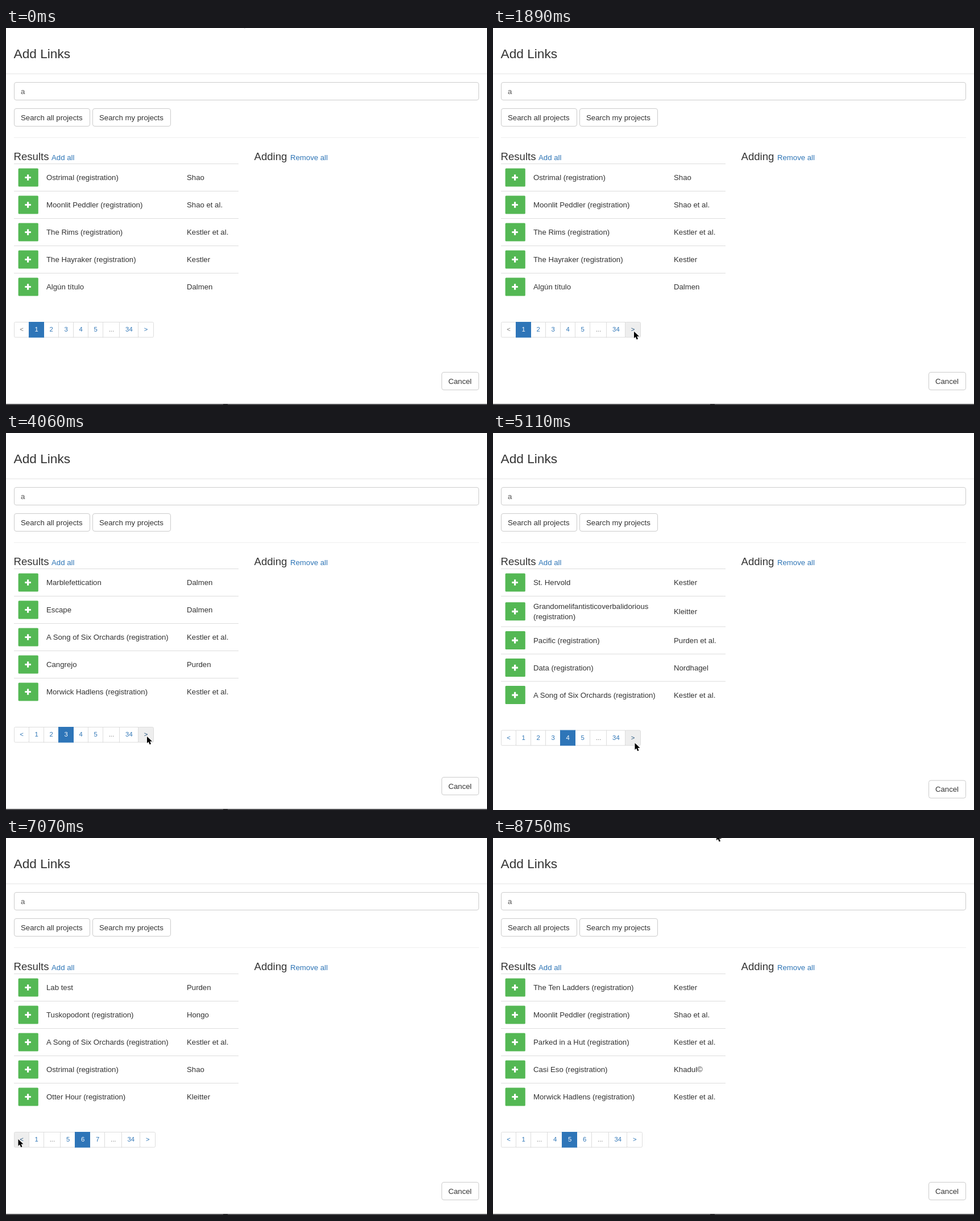
These frames come from a looping animation (846 px wide and 662 px high, 9030 ms). An HTML page:

```html
<!DOCTYPE html>
<html lang="en">
<head>
<meta charset="utf-8">
<title>Add Links</title>
<style>
html, body { margin: 0; width: 100%; height: 100%; overflow: hidden; background: #fff; }
svg { display: block; width: 846px; height: 662px; }
text { font: 13.2px "Liberation Sans", Arial, sans-serif; fill: #333; white-space: pre; }
.title { font-size: 22.7px; }
.head { font-size: 18.6px; }
.link { fill: #2e75b6; }
.input { fill: #555; }
.page { font-size: 11.3px; text-anchor: middle; fill: #2e75b6; }
.page.off { fill: #777; }
.page.on { fill: #fff; }
.page.hover { fill: #23527c; }
</style>
</head>
<body>
<svg viewBox="0 0 846 662"><g id="dialog"></g>
<path id="cursor" d="M0 0v11.8l2.7-2.6 2 4.7 2.3-1-2-4.5h4z" stroke="#fff" paint-order="stroke"/></svg>
<script>
const LOOP = 9030, STEP = 70;
const REG = " (registration)";

// One list per page; each row is a title and an author
const pages = [
  [["Ostrimal" + REG, "Shao"], ["Moonlit Peddler" + REG, "Shao et al."], ["The Rims" + REG, "Kestler et al."],
   ["The Hayraker" + REG, "Kestler"], ["Algún título", "Dalmen"]],
  [["Moonlit Peddler" + REG, "Shao et al."], ["Sample study", "Purden"], ["Parked in a Hut" + REG, "Kestler et al."],
   ["Otter Hour" + REG, "Kleitter"], ["Field notes" + REG, "Shao"]],
  [["Marblefettication", "Dalmen"], ["Escape", "Dalmen"], ["A Song of Six Orchards" + REG, "Kestler et al."],
   ["Cangrejo", "Purden"], ["Morwick Hadlens" + REG, "Kestler et al."]],
  [["St. Hervold", "Kestler"], ["Grandomelifantisticoverbalidorious\n(registration)", "Kleitter"],
   ["Pacific" + REG, "Purden et al."], ["Data" + REG, "Nordhagel"], ["A Song of Six Orchards" + REG, "Kestler et al."]],
  [["The Ten Ladders" + REG, "Kestler"], ["Moonlit Peddler" + REG, "Shao et al."], ["Parked in a Hut" + REG, "Kestler et al."],
   ["Casi Eso" + REG, "Khadul©"], ["Morwick Hadlens" + REG, "Kestler et al."]],
  [["Lab test", "Purden"], ["Tuskopodont" + REG, "Hongo"], ["A Song of Six Orchards" + REG, "Kestler et al."],
   ["Ostrimal" + REG, "Shao"], ["Otter Hour" + REG, "Kleitter"]]
];
const nextClicks = [2380, 2870, 4130, 5180, 6160];
const prevClick = 7490;

// The pointer eases from one stop to the next; bowX and bowY bend the way there
const stops = [
  { begin: 0, end: 910, x: 244, y: 561, bowY: 290 },
  { begin: 1400, end: 1890, x: 248, y: 533 },
  { begin: 4340, end: 4550, x: 248, y: 523, bowY: 65 },
  { begin: 4620, end: 4760, x: 249.5, y: 544.5 },
  { begin: 5110, end: 5250, x: 244, y: 533 },
  { begin: 5390, end: 5600, x: 244, y: 530, bowY: 58 },
  { begin: 6020, end: 6230, x: 249, y: 562 },
  { begin: 6370, end: 6720, x: 21.5, y: 529 },
  { begin: 7700, end: 8400, x: 388, y: 18, bowX: 600, bowY: 240 },
  { begin: 8470, end: 8750, x: 393, y: -7.5 }
];

function cursorAt(t) {
  let x = 415, y = -13.5;
  for (const stop of stops) {
    if (t < stop.begin) break;
    const u = Math.min(1, (t - stop.begin) / (stop.end - stop.begin));
    const ease = u * u * (3 - 2 * u), bow = Math.sin(Math.PI * u);
    x += (stop.x - x) * ease + (stop.bowX || 0) * bow;
    y += (stop.y - y) * ease + (stop.bowY || 0) * bow;
  }
  return [x, y];
}

const pageAt = t => 1 + nextClicks.filter(at => at <= t).length - (t >= prevClick);

const escapeText = s => s.replace(/</g, "&lt;").replace(/>/g, "&gt;");
const text = (x, y, s, cls = "") => `<text x="${x}" y="${y}" class="${cls}">${escapeText(s)}</text>`;
const rect = (x, y, w, h, fill, more = "") => `<rect x="${x}" y="${y}" width="${w}" height="${h}" fill="${fill}" ${more}/>`;
const box = (x, y, w, h) => rect(x + .5, y + .5, w - 1, h - 1, "#fff", 'stroke="#ccc" rx="3.5"');
const button = (x, y, w, s) => box(x, y, w, 32) + text(x + 12, y + 20.5, s);

const header =
  text(13.5, 53, "Add Links", "title") + rect(0, 80, 846, 1, "#e5e5e5") +
  box(14, 95, 818, 32) + text(26, 116, "a", "input") +
  button(14, 141, 134, "Search all projects") + button(152, 141, 138, "Search my projects") +
  rect(14, 192, 818, 1, "#eee") +
  text(13.5, 232, "Results", "head") + text(80, 231.5, "Add all", "link") +
  text(436.5, 232, "Adding", "head") + text(500, 231.5, "Remove all", "link");

function row(y, height, [title, author]) {
  const mid = y + height / 2 + .5;
  const lines = title.split("\n");
  return rect(14, y, 395, 1, "#ddd") +
    rect(21.6, mid - 16, 35.2, 32, "#54b854", 'rx="1.5"') +
    rect(33.3, mid - 1.6, 10.6, 3.2, "#fff", 'rx=".5"') + rect(37, mid - 5.3, 3.2, 10.6, "#fff", 'rx=".5"') +
    lines.map((s, i) => text(71, mid + 4.7 + (i - (lines.length - 1) / 2) * 18.8, s)).join("") +
    text(318, mid + 4.7, author);
}

function pager(page, y, [cx, cy]) {
  const middle = page < 5 ? [2, 3, 4, 5] : ["...", page - 1, page, page + 1];
  let x = 14, cells = "", front = "";
  for (const label of ["<", 1, ...middle, "...", 34, ">"]) {
    const w = { "<": 26.4, ">": 26.6, "...": 29.4, 34: 32.6 }[label] || 26;
    const left = Math.floor(x), width = Math.floor(x + w) - left;
    const active = label === page;
    const off = label === "..." || label === "<" && page === 1;
    const hover = !off && !active && cx >= x && cx < x + w && cy >= y && cy < y + 28;
    const cls = active ? "on" : off ? "off" : hover ? "hover" : "";
    const fill = active ? "#2e75b8" : hover ? "#eee" : "#fff";
    const rx = label === "<" || label === ">" ? 2 : 0;
    const cell = rect(left + .5, y + .5, width, 26.6, fill, `stroke="${active ? fill : "#ddd"}" rx="${rx}"`) +
      text(x + w / 2 + .3, y + 17, String(label), "page " + cls);
    if (active) front = cell; else cells += cell;
    x += w;
  }
  return cells + front;
}

function draw(page, cursor) {
  let y = 238, rows = "";
  for (const item of pages[page - 1]) {
    const height = item[0].includes("\n") ? 53.6 : 48;
    rows += row(y, height, item);
    y += height;
  }
  return header + rows + pager(page, y + 38, cursor) + button(766, y + 126, 66, "Cancel") +
    rect(0, y + 182, 846, 2, "#505053") + rect(382, y + 182, 8, 2, "#29292c");
}

const dialog = document.getElementById("dialog");
const pointer = document.getElementById("cursor");
let shown = -1;

function frame(now) {
  const t = Math.floor(now % LOOP / STEP) * STEP;
  if (t !== shown) {
    shown = t;
    const cursor = cursorAt(t);
    dialog.innerHTML = draw(pageAt(t), cursor);
    pointer.setAttribute("transform", `translate(${cursor})`);
  }
  requestAnimationFrame(frame);
}
frame(performance.now());
</script>
</body>
</html>
```
